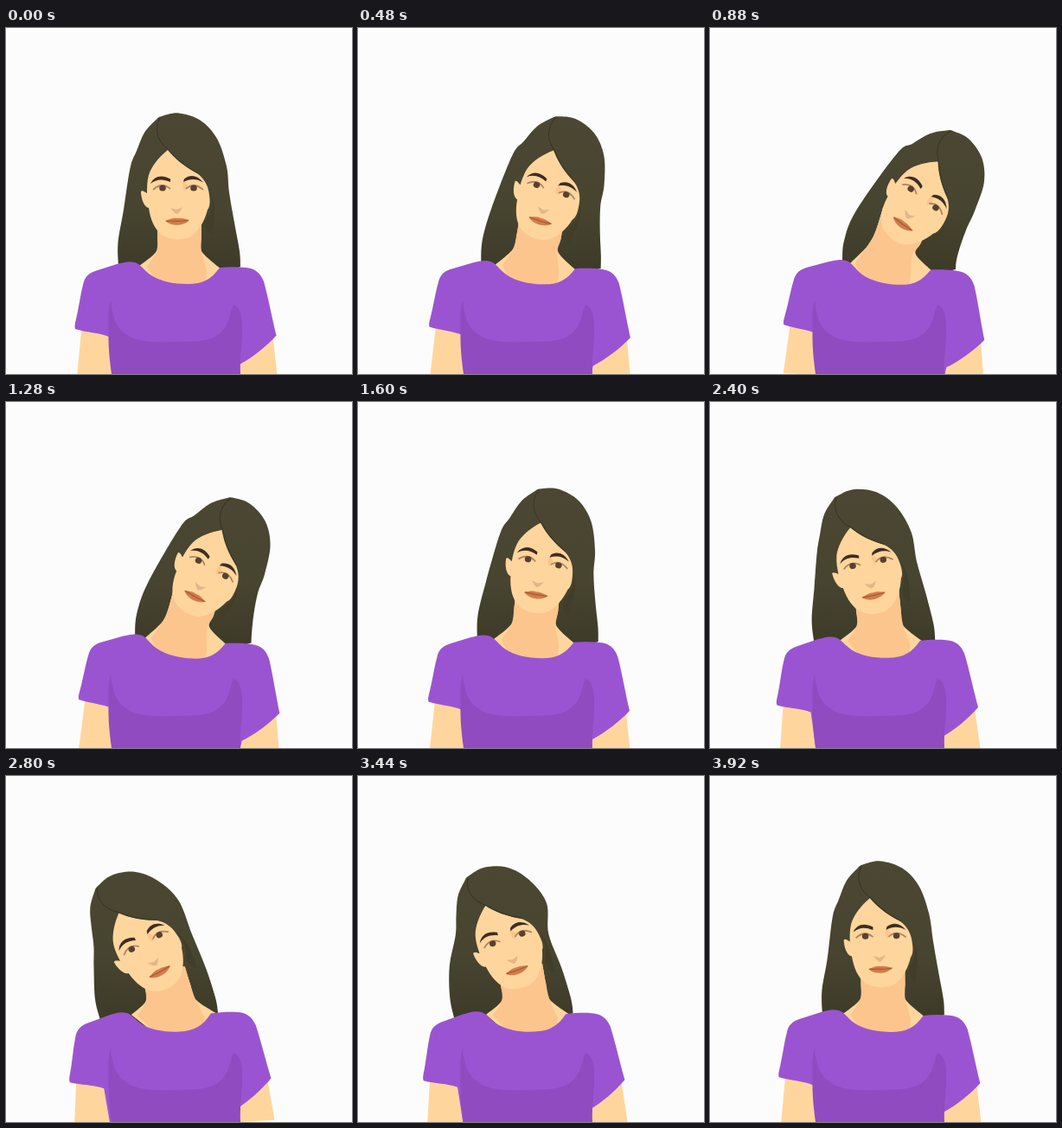
These frames come from a looping animation (400x400 px, 4 s). An HTML page with a canvas:

```html
<!DOCTYPE html>
<html lang="en">
<head>
<meta charset="utf-8">
<title>Head tilt</title>
<style>
html, body { margin: 0; width: 100%; height: 100%; overflow: hidden; background: #fcfcfc; }
canvas { display: block; width: 400px; height: 400px; }
</style>
</head>
<body>
<canvas id="stage" width="400" height="400"></canvas>
<script>
const ctx = document.getElementById('stage').getContext('2d');
const LOOP = 4000, STEP = 80;
const TURN = 1960, BACK = 2080;   // length of the right and the left swing
const RIGHT = 37, LEFT = -27;     // angles of the two tilted poses
const RAD = Math.PI / 180;
const NECK = [205, 262], WAIST = [196, 466];

const SKIN = '#fed69d', SHADE = '#fbc58d', SHIRT = '#9b54d1', FOLD = '#904bc0';
const BROW = '#3e2e22', IRIS = '#58412f', LID = '#b08562';

const shirt = new Path2D(`M128 273 C136 271 142 269 149 271 C156 273 159 280 168 286
  C179 293 194 296 210 296 C227 296 237 291 247 277 C258 276 268 276 277 277
  C288 278 294 283 298 293 C303 311 307 333 312.500 355.500
  C301 368 285 381 270 389 L268 400 L124 400 L119 357
  C107 352 93 352 80 348 Q79 345 80 341 C84 325 86 308 89 297
  C91 287 96 283 106 280 Z`);
const arms = new Path2D('M88 340 L82 404 H130 V340 Z M307 345 L314 404 H262 V370 Z');
const torso = new Path2D(`M121 315 C123 328 124 341 134 350 C146 362 165 364 190 363
  C217 362 237 364 249 351 C259 342 258 330 263 320 C269 321 273 330 273 345
  C274 361 270 379 271 400 H122 C120 385 118 368 118.500 350 C118 337 118 322 121 315 Z`);
const face = new Path2D(`M187 141 C177 149 168 160 165 170 C163 177 163 184 163 191
  C160 189 157 187 156 189 C156 196 159 207 165 208 C167 222 172 233 180 239
  C190 246 206 246 215 240 C224 233 230 222 233 210 C236 207 236 200 235 193
  C234 182 229 174 221 168 C206 160 196 152 187 141 Z`);
const parting = new Path2D('M178 104 C173 112 173 124 180 133 Q184 138 188 141 C197 152 209 161 222 168');
const strand = new Path2D('M236 190 C239 201 239 211 233 220 C230 227 231 234 238 239 C240 225 244 206 236 190 Z');
const brows = new Path2D(`M167 180 C171 172 179 168.500 190 174.500 L190 178 C181 174 174 174.500 167 180 Z
  M205 178 L206 174.500 C213 169 221 170 228 178.500 C220 174 213 174 205 178 Z`);
const lids = new Path2D('M170 187 Q180 177.500 190 186 M208 186 Q217 177.500 228 187');
const eyeShade = new Path2D('M206 176 C203 180 204 186 207 189 L210 182 Z');
const nose = new Path2D('M190 208 Q194 209 197 210 Q201 209 204 207 Q201 214 197 215 Q193 213 190 208 Z');
const lips = new Path2D('M184 223 C190 221 193 219 198 220 C203 219 207 221 212 222 C206 229 191 230 184 223 Z');
const mouth = new Path2D('M185 223 Q198 224 211 222.500');

// Crown of the hair, moves rigidly with the head
const crown = [[143.5, 162], [151, 142], [160, 121], [173, 106.5], [180, 102], [200, 98.5],
  [225, 107], [244, 128], [255, 160]];

// Soft points: x, y upright, then tilted right, then tilted left
const hairRight = [
  [258, 190, 297, 231, 215, 183], [264, 225, 290, 250, 231, 222],
  [270, 258, 285, 268, 242, 256], [271, 276, 284, 279, 245, 273]];
const hairLeft = [
  [130, 275, 153, 269, 109, 282], [129.5, 248, 155, 246, 103, 258],
  [136, 210, 169, 211, 101.5, 222]];
const neckTop = [
  [175, 215, 200, 208, 154, 222], [175, 240, 191, 236, 160, 242],
  [174, 258, 182, 252, 162, 260]];
const neckSide = [
  [226, 258, 238, 262, 219, 258], [226, 240, 243, 250, 213, 240],
  [226, 215, 250, 235, 207, 220]];
const shoulderL = [154, 275, 162, 272, 145, 276], shoulderR = [249, 279, 258, 282, 244, 275];
const shadeL = [163, 276, 168, 272, 152, 277], shadeR = [232, 280, 232, 284, 230, 280];
const shadeTop = [226, 258, 234, 262, 219, 258];

// Quadratic blend through the three poses
function soften([x, y, rx, ry, lx, ly], a) {
  const r = a * (a - LEFT) / (RIGHT * (RIGHT - LEFT));
  const l = a * (a - RIGHT) / (LEFT * (LEFT - RIGHT));
  const u = 1 - r - l;
  return [x * u + rx * r + lx * l, y * u + ry * r + ly * l];
}

// Hanging hair comes to rest on the left shoulder before the head stops
function hang(a) {
  if (a > 0) return a;
  const x = Math.min(1, 1.15 * a / LEFT);
  return LEFT * x * x * (3 - 2 * x);
}

function headShift(a) {
  return a < 0 ? [a * 0.11, a * 0.16] : [0, 0];
}

function turn([x, y], a) {
  const c = Math.cos(a * RAD), s = Math.sin(a * RAD);
  const dx = x - NECK[0], dy = y - NECK[1], [sx, sy] = headShift(a);
  return [NECK[0] + dx * c - dy * s + sx, NECK[1] + dx * s + dy * c + sy];
}

// Smooth open curve through the points
function curve(path, pts) {
  path.lineTo(...pts[0]);
  for (let i = 0; i < pts.length - 1; i++) {
    const p = pts[i - 1] || pts[i], a = pts[i], b = pts[i + 1], n = pts[i + 2] || b;
    path.bezierCurveTo(a[0] + (b[0] - p[0]) / 6, a[1] + (b[1] - p[1]) / 6,
      b[0] - (n[0] - a[0]) / 6, b[1] - (n[1] - a[1]) / 6, b[0], b[1]);
  }
}

function fill(path, color) {
  ctx.fillStyle = color;
  ctx.fill(path);
}

function line(path, color, width) {
  ctx.strokeStyle = color;
  ctx.lineWidth = width;
  ctx.stroke(path);
}

function around([x, y], deg, draw, [sx, sy] = [0, 0]) {
  ctx.save();
  ctx.translate(x + sx, y + sy);
  ctx.rotate(deg * RAD);
  ctx.translate(-x, -y);
  draw();
  ctx.restore();
}

function drawHair(a) {
  const soft = p => soften(p, hang(a));
  const hair = new Path2D();
  curve(hair, [...hairLeft.map(soft), ...crown.map(p => turn(p, a)), ...hairRight.map(soft)]);
  hair.lineTo(240, 290);
  hair.lineTo(165, 290);
  hair.closePath();
  const tone = ctx.createLinearGradient(0, 100, 0, 280);
  tone.addColorStop(0, '#4b4732');
  tone.addColorStop(0.6, '#474430');
  tone.addColorStop(1, '#3d3b28');
  fill(hair, tone);
}

function drawNeck(a) {
  const soft = p => soften(p, a);
  const left = neckTop.map(soft), right = neckSide.map(soft);
  const neck = new Path2D();
  curve(neck, [...left, soft(shoulderL)]);
  neck.lineTo(175, 300);
  neck.lineTo(235, 300);
  curve(neck, [soft(shoulderR), ...right]);
  neck.closePath();
  fill(neck, SKIN);

  const shade = new Path2D();
  curve(shade, [...left, soft(shadeL)]);
  shade.lineTo(180, 302);
  shade.lineTo(230, 302);
  curve(shade, [soft(shadeR), soft(shadeTop), ...right.slice(1)]);
  shade.closePath();
  fill(shade, SHADE);
}

function drawFace() {
  fill(strand, '#403d2a');
  fill(face, SKIN);
  line(parting, '#393522', 1);
  fill(eyeShade, SHADE);
  line(lids, LID, 1.8);
  for (const x of [181, 217]) {
    const eye = new Path2D();
    eye.ellipse(x, 185, 3.8, 3.5, 0, 0, 7);
    fill(eye, IRIS);
  }
  fill(brows, BROW);
  fill(nose, '#e5b58a');
  fill(lips, '#d07c4d');
  line(mouth, '#a9553a', 1.2);
}

function tilt(t) {
  return t < TURN
    ? 38 * Math.sin(Math.PI * t / TURN) ** 2
    : -30 * Math.sin(Math.PI * (t - TURN) / BACK) ** 2;
}

function render(time) {
  const a = tilt(Math.floor((time % LOOP) / STEP) * STEP);
  ctx.fillStyle = '#fcfcfc';
  ctx.fillRect(0, 0, 400, 400);
  drawHair(a);
  drawNeck(a);
  around(WAIST, a * (a > 0 ? 0.068 : 0.112), () => {
    fill(arms, SKIN);
    fill(shirt, SHIRT);
  });
  fill(torso, FOLD);
  around(NECK, a, drawFace, headShift(a));
}

let start;
function tick(now) {
  start ??= now;
  render(Math.max(0, now - start));
  requestAnimationFrame(tick);
}
render(0);
requestAnimationFrame(tick);
</script>
</body>
</html>
```
